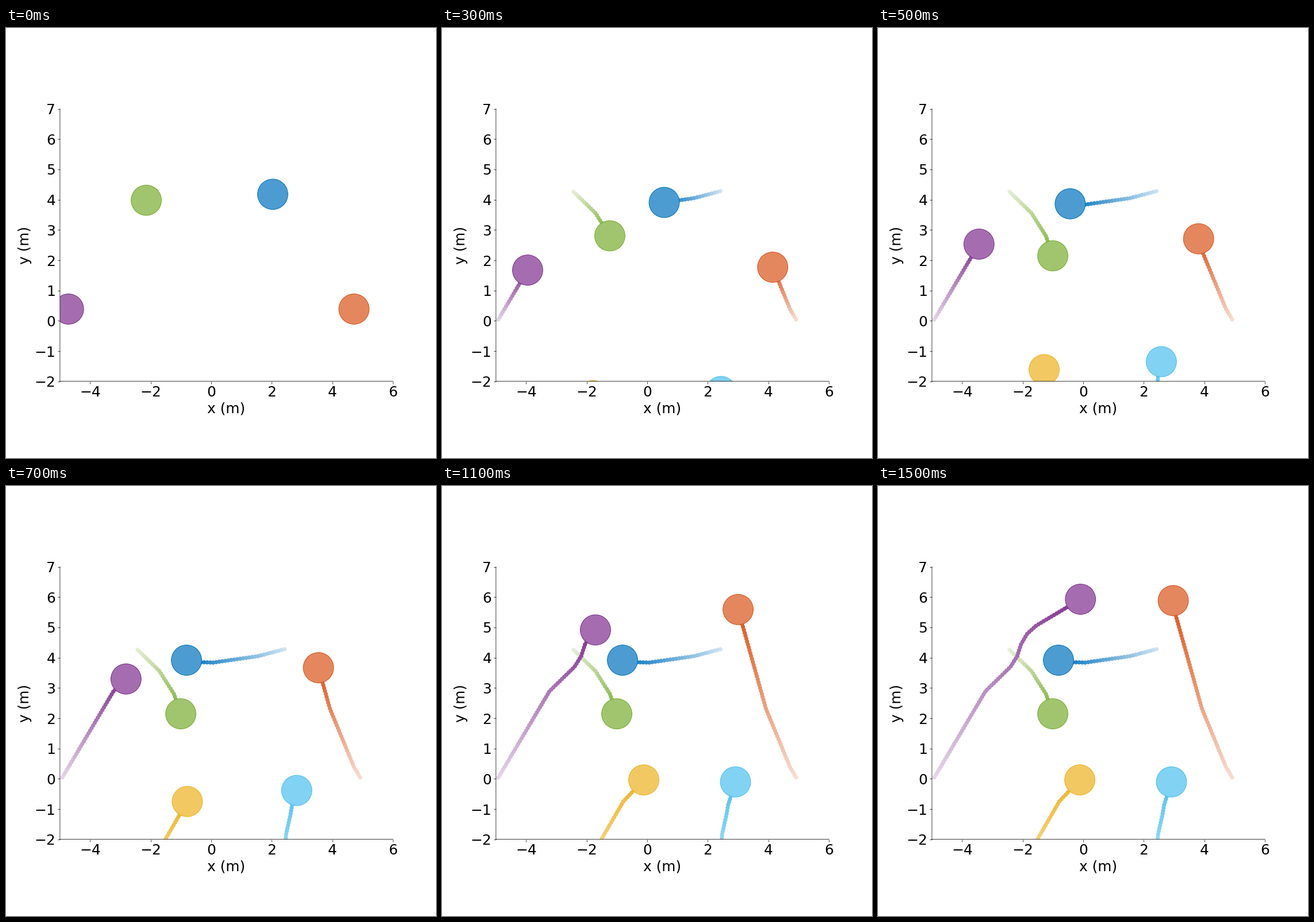
Animation, 748 px wide and 748 px high, one loop 2500 ms. Source, as a matplotlib script:

```python
import numpy as np
import matplotlib.pyplot as plt
from matplotlib.animation import FuncAnimation
from matplotlib.colors import to_rgb

INCHES, DPI = 10, 74.8
FRAMES, INTERVAL = 25, 100
FIRST_STEP, STEPS_PER_FRAME, LAST_STEP = 4, 5, 79
STEP_LENGTH = 0.0997  # metres walked per simulation step
RADIUS = 0.5
LINE = 0.72

# Each agent walks at constant speed through its corners (metres), then stops.
AGENTS = [
    ("#0072bd", [(2.415, 4.28), (1.54, 4.05), (0.07, 3.84), (-0.32, 3.85),
                 (-0.816, 3.918)]),
    ("#d95319", [(4.915, 0.047), (4.71, 0.395), (3.92, 2.31), (3.0, 5.59),
                 (2.971, 5.886)]),
    ("#edb120", [(-2.74, -4.11), (-0.787, -0.74), (-0.114, -0.034)]),
    ("#77ac30", [(-2.43, 4.26), (-1.71, 3.56), (-1.23, 2.8),
                 (-1.005, 2.148)]),
    ("#7e2f8e", [(-4.915, 0.047), (-3.226, 2.894), (-2.4, 3.7), (-2.18, 4.05),
                 (-2.05, 4.45), (-1.85, 4.79), (-1.55, 5.06),
                 (-0.091, 5.93)]),
    ("#4dbeee", [(2.3, -4.22), (2.47, -1.83), (2.62, -1.16), (2.67, -0.86),
                 (2.913, -0.099)]),
]


def blend(color, strength):
    """Mix a colour with white; strength may be a number or an array."""
    strength = np.asarray(strength)[..., None]
    return 1 - strength * (1 - np.array(to_rgb(color)))


def walk(corners):
    """Positions after each step along the corners, ending on the last one."""
    corners = np.array(corners)
    lengths = np.hypot(*np.diff(corners, axis=0).T)
    travelled = np.concatenate([[0], np.cumsum(lengths)])
    steps = np.arange(np.ceil(travelled[-1] / STEP_LENGTH) + 1)
    return np.column_stack([np.interp(steps * STEP_LENGTH, travelled, axis)
                            for axis in corners.T])


def build_axes():
    plt.rcParams.update({"font.family": "DejaVu Sans", "font.size": 24})
    fig, ax = plt.subplots(figsize=(INCHES, INCHES), dpi=DPI)
    fig.patch.set_facecolor("white")
    ax.spines[["top", "right"]].set_visible(False)
    for side in ("left", "bottom"):
        spine = ax.spines[side]
        spine.set_position(("outward", -LINE / 2))
        spine.set_linewidth(LINE)
        spine.set_snap(False)
    ax.set(xlim=(-5, 6), ylim=(-2, 7), xlabel="x (m)", ylabel="y (m)",
           xticks=range(-4, 7, 2), yticks=range(-2, 8))
    ax.tick_params(width=LINE, pad=3.5 + LINE / 2)
    ax.set_aspect("equal")
    return fig, ax


class Agent:
    def __init__(self, ax, color, corners):
        self.color = color
        self.path = walk(corners)
        self.trail = ax.scatter([], [], s=36, linewidths=1, zorder=1)
        self.body = plt.Circle(self.path[0], RADIUS, fc=blend(color, 0.7),
                               ec=color, lw=1, zorder=2)
        ax.add_patch(self.body)

    def show(self, step):
        step = min(step, len(self.path) - 1)
        shades = blend(self.color, np.linspace(0.2, 1, step + 1))
        self.trail.set_offsets(self.path[:step + 1])
        self.trail.set_facecolor(shades)
        self.trail.set_edgecolor(shades)
        self.body.center = tuple(self.path[step])


fig, ax = build_axes()
agents = [Agent(ax, color, corners) for color, corners in AGENTS]


def update(frame):
    step = min(FIRST_STEP + STEPS_PER_FRAME * frame, LAST_STEP)
    for agent in agents:
        agent.show(step)
    return []


anim = FuncAnimation(fig, update, frames=FRAMES, interval=INTERVAL,
                     init_func=lambda: update(0), repeat=True, repeat_delay=0)
plt.show()
```
